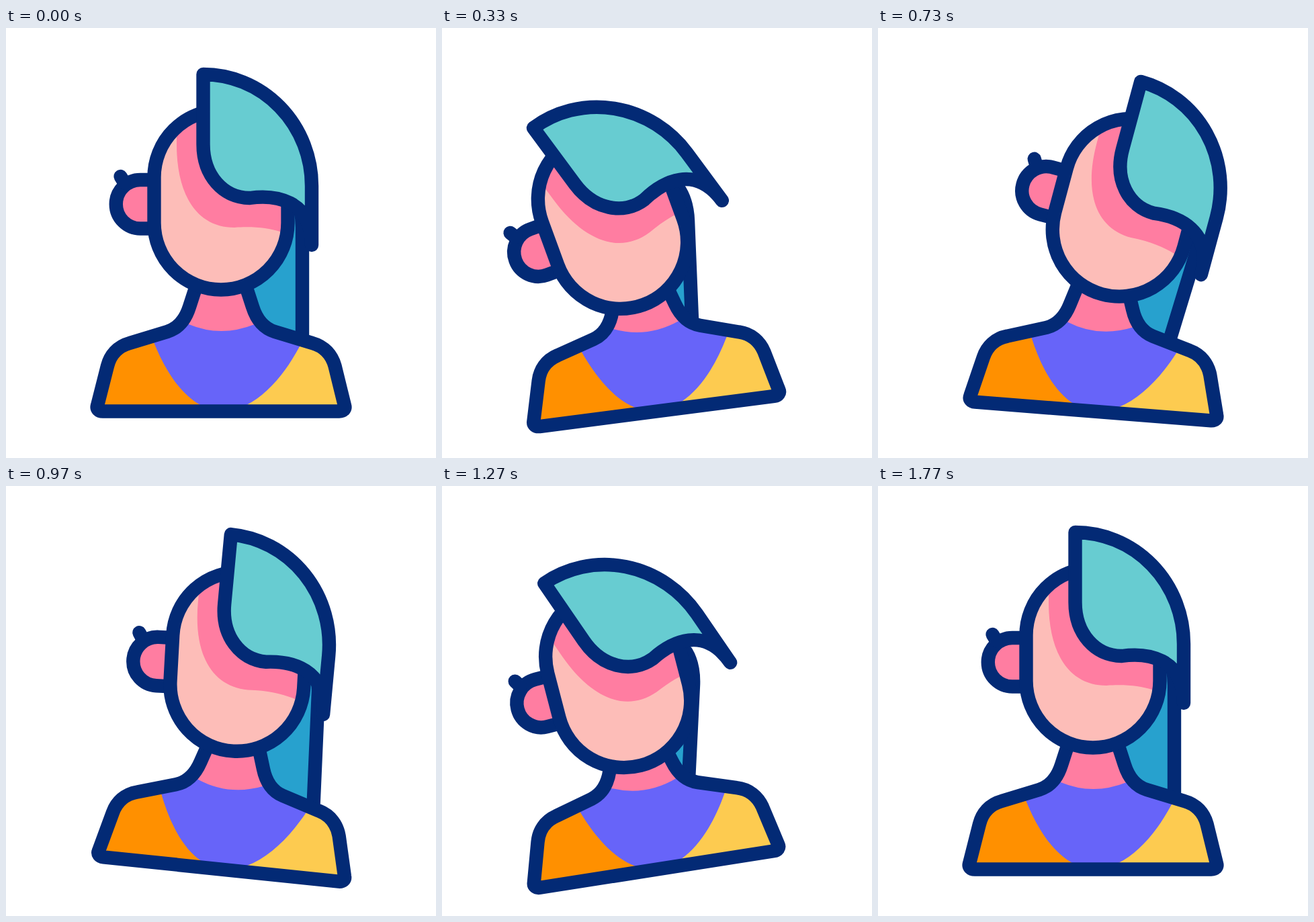
An HTML page for the animation above (2000 ms loop, 640 by 640 pixels).

```html
<!DOCTYPE html>
<html lang="en">
<head>
<meta charset="utf-8">
<title>Swaying portrait</title>
<style>
  html, body { margin: 0; width: 100%; height: 100%; overflow: hidden; background: #fff; }
  svg { display: block; width: 100vw; height: 100vh; }
  .line { fill: none; stroke: #032a75; stroke-width: 20.4; stroke-linecap: round; stroke-linejoin: round; }
</style>
</head>
<body>
<svg viewBox="0 0 640 640">
  <defs>
    <path id="torso" d="M285 378 L273 415 C267 434 256 447 240 452 L184 469 C166 474 155 487 151 503
      L136 562 C134.500 567 138 570.500 144 570.500 H496 C502 570.500 505.500 567 504 562
      L489.500 503 C485 487 474 474 456 469 L400 452 C384 447 373 434 367 415 L355 378 Z"/>
    <path id="skull" d="M220.500 222 A99.500 99.500 0 0 1 419.500 222 V290 A99.500 99.500 0 0 1 220.500 290 Z"/>
    <path id="fringe" d="M293.500 69 A161.500 166 0 0 1 455 235 V323 C455 255 400 248 363 253
      C324 253.500 293.500 220 293.500 173 Z"/>
    <clipPath id="torsoClip"><use href="#torso"/></clipPath>
    <clipPath id="skullClip"><use href="#skull"/></clipPath>
  </defs>

  <g id="tail">
    <path fill="#27a1ce" d="M355 300 L420 265 H436 L441 285 V475 H355 Z"/>
    <path class="line" d="M428 247 C436 259 441 276 441 297 V472"/>
  </g>

  <g id="body">
    <g clip-path="url(#torsoClip)">
      <path fill="#6764f9" d="M120 370 H520 V590 H120 Z"/>
      <path fill="#ff9000" d="M213 448 L220 468 C235 505 258 545 291 562 V590 H100 V448 Z"/>
      <path fill="#fdcb50" d="M447 455 L437 474 C415 515 388 546 358 561 V590 H540 V455 Z"/>
      <path fill="#ff7da1" d="M250 430 L272 441 Q320 461 370 441 L390 430 V370 H250 Z"/>
    </g>
    <use href="#torso" class="line"/>
  </g>

  <g id="head">
    <path class="line" style="fill:#ff7da1" d="M221 226 H200 A36 36 0 0 0 200 298.500 H221"/>
    <path class="line" d="M170.500 221 L176 230"/>
    <use href="#skull" fill="#fdbdb8"/>
    <g clip-path="url(#skullClip)">
      <path id="shade" fill="#ff7da1" d="M254 20 V173 C254 250 285 297 340 297 C370 295 390 298 408 303
        Q430 310 450 325 V20 Z"/>
    </g>
    <use href="#skull" class="line"/>
  </g>

  <g id="hair">
    <use href="#fringe" class="line" style="fill:#67ccd1"/>
  </g>
</svg>
<script>
  const LOOP = 2000, STEP = 100 / 3, LAST = 53;
  const BEATS = [13, 26, 39, LAST];       // left, right, left, rest
  const HEAD_BEATS = [13, 22, 33, 46];    // the head runs ahead of the body

  const ease = u => u * u * (3 - 2 * u);

  // Eases from rest through three poses and back; settle < 1 softens the last move
  function sway(step, poses, beats = BEATS, settle = 0.56) {
    const times = [0, ...beats], values = [0, ...poses, 0];
    const i = times.findIndex((t, n) => n > 0 && step <= t);
    if (i < 0) return 0;
    const u = (step - times[i - 1]) / (times[i] - times[i - 1]);
    const power = i === beats.length ? settle : 1;
    return values[i - 1] + (values[i] - values[i - 1]) * ease(u ** power);
  }

  const turn = (angle, x, y) => `rotate(${angle.toFixed(3)} ${x} ${y})`;
  const place = (id, transform) => document.getElementById(id).setAttribute("transform", transform);

  function draw(time) {
    const step = Math.min(LAST, Math.floor((time % LOOP + 3.4) / STEP));
    const drop = sway(step, [24.5, 1, 25]);
    const body = turn(sway(step, [-8.5, 8.3, -9.2]), 320, 571);
    const tilt = turn(sway(step, [-14.7, 10.5, -8.5], HEAD_BEATS, 1), 320, 388);
    const head = `${body} translate(0 ${drop.toFixed(3)}) ${tilt}`;
    const sweep = turn(sway(step, [-19, 5.7, -20.3]), 334, 206);
    place("body", body);
    place("head", head);
    place("shade", sweep);
    place("hair", `${head} ${sweep}`);
    place("tail", `${head} ${turn(sway(step, [20.5, -3.5, 17.8]), 441, 245)}`);
  }

  const start = performance.now();
  function tick() {
    draw(performance.now() - start);
    requestAnimationFrame(tick);
  }
  tick();
</script>
</body>
</html>
```
